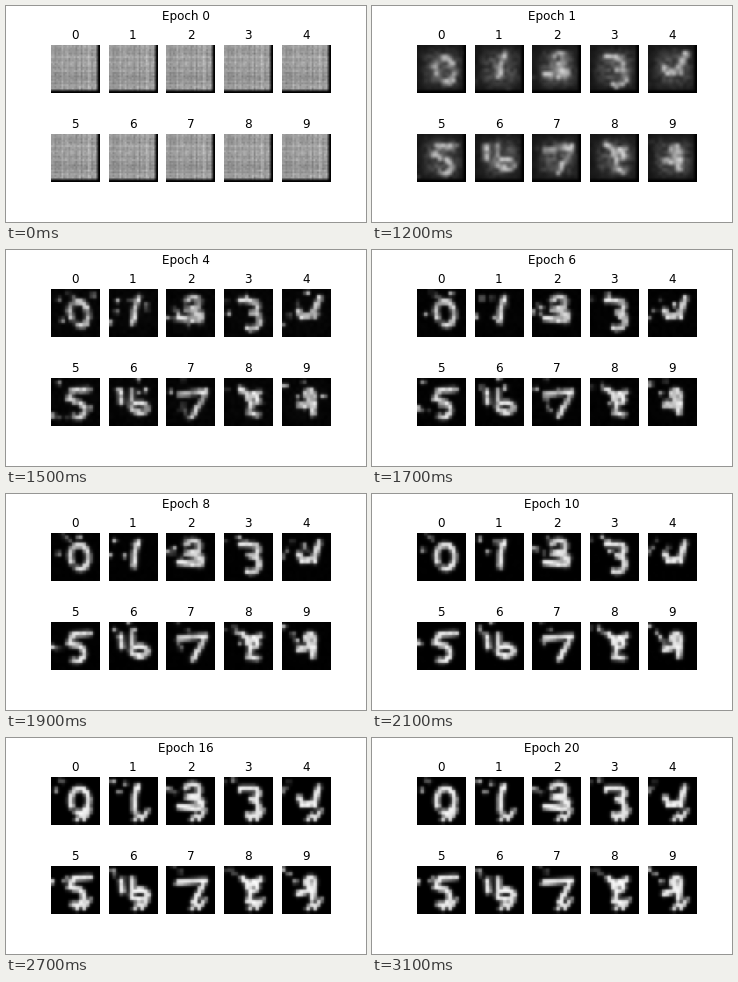
Recreate the animation shown at these times as a matplotlib script. Size 360 by 216 pixels, loop 4.2 s.

```python
import numpy as np
import matplotlib.pyplot as plt
from matplotlib.animation import FuncAnimation

plt.rcParams["font.family"] = "DejaVu Sans"

SIDE = 48         # strokes are given in tile pixels
CELLS = 14        # coarse cells per side, each shown as 2 by 2 samples
N = 2 * CELLS
HOLD = 12         # ticks spent on the untrained picture
LAST = 20         # last epoch
TICKS = 42

centre = (np.arange(CELLS) + 0.5) * SIDE / CELLS
X, Y = np.meshgrid(centre, centre)


def line(*xy):
    return np.reshape(xy, (-1, 2)).astype(float)


def arc(cx, cy, rx, ry, start=0, end=360):
    a = np.radians(np.linspace(start, end, 12))
    return np.column_stack([cx + rx * np.cos(a), cy + ry * np.sin(a)])


GLYPHS = [
    [arc(28, 24, 9, 12, 150, 470)],
    [line(28, 10, 25, 20, 25, 34)],
    [arc(26, 14, 7, 6, 200, 400), line(31, 18, 21, 21, 36, 25, 34, 32, 13, 30)],
    [line(17, 12, 30, 12), arc(28, 17, 6, 5, -90, 90), arc(27, 31, 7, 8, -90, 120)],
    [line(17, 21, 20, 28, 31, 27, 36, 11), line(34, 18, 32, 29)],
    [line(38, 12, 22, 13, 18, 22), arc(24, 31, 8, 8, -100, 110)],
    [line(12, 15, 13, 26), line(23, 14, 23, 25), arc(30, 29, 8, 5)],
    [line(13, 17, 38, 15, 34, 24, 27, 37)],
    [line(18, 13, 24, 19, 36, 14), arc(28, 21, 5, 4), line(27, 24, 24, 36, 33, 36)],
    [arc(28, 17, 4, 5), line(31, 20, 30, 34), line(16, 28, 24, 26)],
]
SLASHES = [line(25, 43, 30, 38), line(32, 42, 38, 34)]


def distance(a, b):
    d = b - a
    t = ((X - a[0]) * d[0] + (Y - a[1]) * d[1]) / max(d @ d, 1e-6)
    t = np.clip(t, 0, 1)
    return np.hypot(X - a[0] - t * d[0], Y - a[1] - t * d[1])


def ink(strokes, width):
    img = np.zeros_like(X)
    for pts in strokes:
        for a, b in zip(pts[:-1], pts[1:]):
            img = np.maximum(img, np.exp(-(distance(a, b) / width) ** 2))
    return np.clip(1.6 * img, 0, 1)


def enlarge(img, spread):
    """Double the cells, then soften with a three-tap filter."""
    img = np.pad(np.kron(img, np.ones((2, 2))), 1, mode="edge")
    img = spread * (img[:-2] + img[2:]) + (1 - 2 * spread) * img[1:-1]
    return spread * (img[:, :-2] + img[:, 2:]) + (1 - 2 * spread) * img[:, 1:-1]


def rim(strength):
    """Darkening along the right and bottom sides."""
    fade = np.ones(N)
    fade[-2:] = 1 - strength * np.array([0.5, 1])
    return fade * fade[:, None]


def bend(pts, phase, size):
    """Sway the points of a stroke sideways and up or down."""
    sway = np.sin(pts[:, ::-1] / 6 + phase)
    return pts + size * sway


def blank_tile(digit):
    rng = np.random.default_rng(7)
    rows, cols = rng.normal(0, 0.035, (2, N))
    weave = rows[:, None] - rows.mean() + cols - cols.mean()
    own = np.random.default_rng(digit).normal(0, 0.012, (N, N))
    return np.clip(0.61 + weave + rng.normal(0, 0.025, (N, N)) + own, 0, 1) * rim(1)


def trained_tile(epoch, digit):
    rng = np.random.default_rng(30 + digit)
    phase = rng.uniform(0, 2 * np.pi, 2)
    grain = rng.random((CELLS, CELLS))
    spots = rng.uniform(2, SIDE - 2, (8, 2))
    glow = rng.uniform(0.2, 0.9, 8)

    s = np.clip((epoch - 3) / 12, 0, 1)
    rough = (1 - s) ** 2
    haze = np.exp(1 - epoch)

    strokes = [bend(p, phase, 1.5 * rough) for p in GLYPHS[digit]]
    img = ink(strokes, 2.5 + 0.5 * haze) * (1 - (0.12 + 0.5 * rough) * grain)

    slash = np.clip((epoch - 11) / 4, 0, 1)
    img = np.maximum(img, 0.9 * slash * ink(SLASHES, 2))

    # stray spots thin out and retreat to the top left corner
    count = int(round(3 + 5 * rough))
    for p, g in zip(spots[:count] * (0.4 + 0.6 * rough), glow):
        spot = ink([np.array([p, p])], 2)
        img = np.maximum(img, g * (1 - 0.7 * haze) * spot)

    window = np.exp(-((X - 25) / 18) ** 4 - ((Y - 24) / 18) ** 4)
    murk = haze * (0.07 + window * (0.08 + 0.25 * grain[::-1]))
    img = np.maximum(img * (1 - 0.1 * haze), murk) + 0.03 * rough * grain.T
    return np.clip(enlarge(img, 0.14 + 0.12 * haze), 0, 1) * rim(haze)


def tile(epoch, digit):
    return trained_tile(epoch, digit) if epoch else blank_tile(digit)


fig, axes = plt.subplots(2, 5, figsize=(5, 3), dpi=72)
fig.subplots_adjust(left=0.125, right=0.9, bottom=0.125, top=0.88, wspace=0.2, hspace=0.2)
heading = fig.suptitle("Epoch 0", fontsize=12)
images = []
for d, ax in enumerate(axes.flat):
    images.append(ax.imshow(tile(0, d), cmap="gray", vmin=0, vmax=1))
    ax.set_title(str(d), fontsize=12)
    ax.axis("off")


def draw(i):
    epoch = min(max(i - HOLD + 1, 0), LAST)
    heading.set_text(f"Epoch {epoch}")
    for d, im in enumerate(images):
        im.set_data(tile(epoch, d))
    return [heading, *images]


anim = FuncAnimation(fig, draw, frames=TICKS, interval=100, repeat=True, repeat_delay=0)
plt.show()
```
